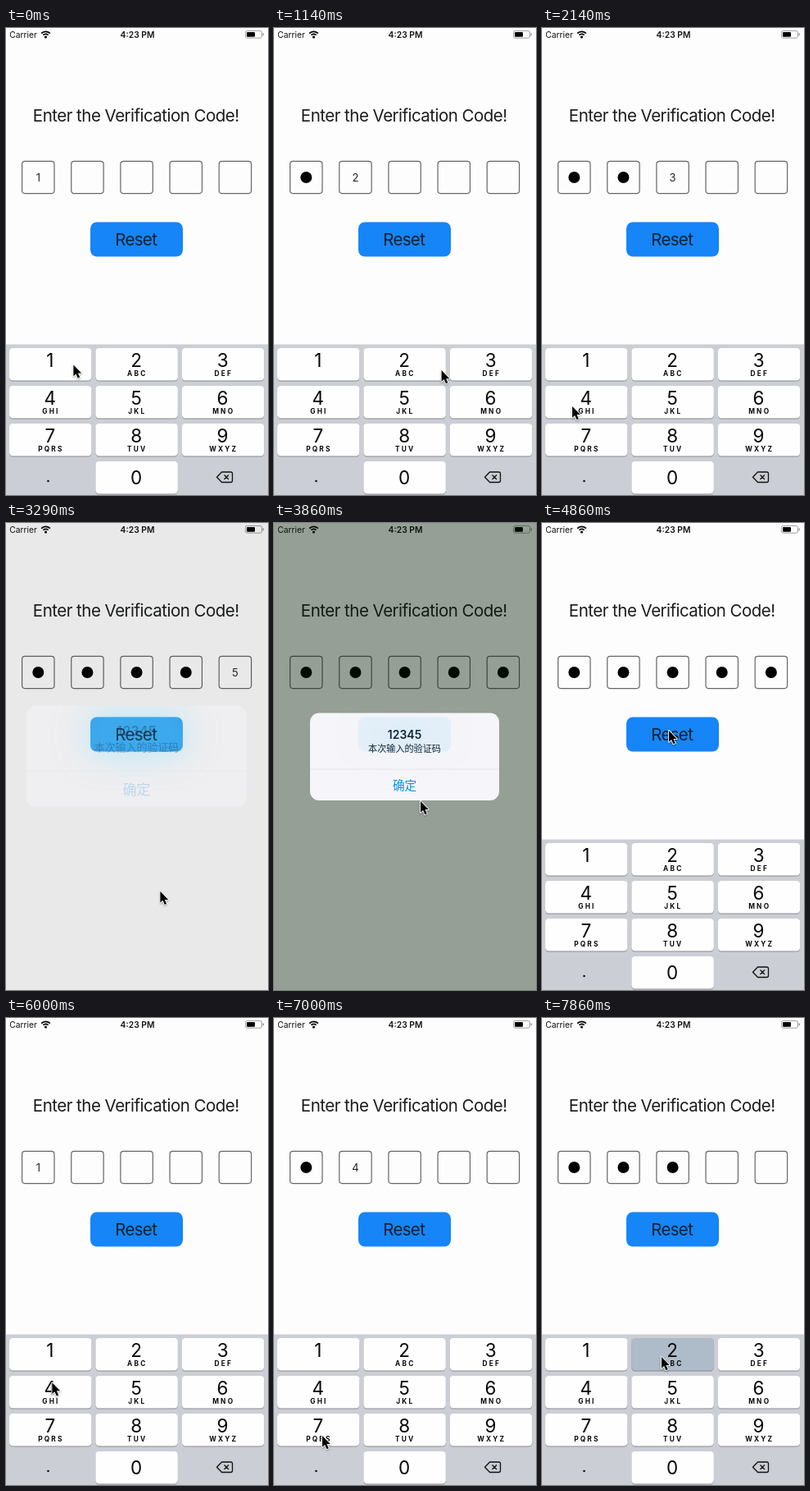
Animation of 320 by 569 pixels, one loop 8000 ms. Source, as an HTML page with a canvas:

```html
<!DOCTYPE html>
<html lang="en">
<head>
<meta charset="utf-8">
<title>Verification code</title>
<style>
  html, body { margin: 0; width: 100%; height: 100%; overflow: hidden; background: #fefdfe; }
  canvas { display: block; width: 320px; height: 569px; }
</style>
</head>
<body>
<canvas id="stage"></canvas>
<script>
const W = 320, H = 569, LOOP = 8000;
const canvas = document.getElementById('stage');
const ctx = canvas.getContext('2d');
const ratio = window.devicePixelRatio || 1;
canvas.width = W * ratio;
canvas.height = H * ratio;

const FONT = 'Inter, "Noto Sans CJK SC", "Noto Sans CJK", sans-serif';
const LETTERS = ['', 'ABC', 'DEF', 'GHI', 'JKL', 'MNO', 'PQRS', 'TUV', 'WXYZ'];
const BUTTON = [103, 236.5, 113, 42, 8];
const KEY = { left: 4, top: 390, pitchX: 105.4, pitchY: 46, w: 100.4, h: 39.5 };

const HOLD = 140, MASK_DELAY = 600;
const KEYBOARD_HIDE = 2880, ALERT_SHOW = 3254, CONFIRM = 4300, KEYBOARD_SHOW = 4315, RESET = 5040;

const clamp = v => Math.max(0, Math.min(1, v));
const easeOut = v => 1 - (1 - v) ** 3;

// Critically damped spring going from 0 to 1
function spring(ms) {
  const x = 0.02285 * Math.max(0, ms);
  return 1 - (1 + x) * Math.exp(-x);
}

// Taps at the given points, ending at `last`; earlier gaps are longer by `slowdown`
function typeKeys(points, last, gap, slowdown) {
  return points.map(([x, y], i) => {
    const k = points.length - 1 - i;
    const column = Math.floor(x / KEY.pitchX), row = Math.floor((y - KEY.top) / KEY.pitchY);
    return { x, y, digit: 1 + column + 3 * row, time: last - gap * k - slowdown * k * (k - 1) / 2 };
  });
}

const taps = [
  ...typeKeys([[75, 410], [147, 414], [260, 420], [37, 461], [189, 456]], 2870, 430, 250),
  { x: 179, y: 339, time: CONFIRM },
  { x: 155, y: 253, time: RESET },
  ...typeKeys([[52, 406], [57, 450], [59, 509], [146, 413]], 7930, 740, 0)
];
const keyTaps = taps.filter(tap => tap.digit);
const isHeld = (time, t) => t >= time - HOLD && t < time;

function box(x, y, w, h, r, fill, stroke) {
  ctx.beginPath();
  ctx.roundRect(x, y, w, h, r);
  if (fill) { ctx.fillStyle = fill; ctx.fill(); }
  if (stroke) { ctx.strokeStyle = stroke; ctx.stroke(); }
}

function disc(x, y, r, fill) {
  ctx.beginPath();
  ctx.arc(x, y, r, 0, 7);
  ctx.fillStyle = fill;
  ctx.fill();
}

// Text centred on (x, y) by its cap height
function label(str, x, y, size, color, weight = 400, spacing = 0) {
  ctx.font = `${weight} ${size}px ${FONT}`;
  ctx.letterSpacing = spacing + 'px';
  ctx.textAlign = 'center';
  ctx.fillStyle = color;
  ctx.fillText(str, x + spacing / 2, y + size * 0.364);
}

function faded(alpha, draw) {
  ctx.save();
  ctx.globalAlpha = clamp(alpha);
  draw();
  ctx.restore();
}

function fillStage(color) {
  ctx.fillStyle = color;
  ctx.fillRect(0, 0, W, H);
}

function statusBar() {
  label('Carrier', 21, 8, 10.3, '#111');
  label('4:23 PM', 160.5, 8, 10.3, '#111', 600);
  disc(48.5, 11, 1.6, '#000');
  ctx.strokeStyle = '#000';
  ctx.lineWidth = 1.7;
  for (const r of [4.2, 7.2]) {
    ctx.beginPath();
    ctx.arc(48.5, 11.5, r, -2.4, -0.74);
    ctx.stroke();
  }
  ctx.lineWidth = 0.8;
  box(292.5, 3.4, 20, 8.8, 2.2, null, '#888');
  box(294, 4.9, 10, 5.8, 1, '#000');
  box(313.6, 6.2, 1.2, 3.2, 0.6, '#888');
}

function resetLabel(alpha) {
  faded(alpha, () => label('Reset', 159, 258, 20.5, '#14202c', 400, -0.65));
}

function codeCells(t) {
  const entered = keyTaps.filter(tap => tap.time <= t && (t < RESET || tap.time > RESET));
  ctx.lineWidth = 1.2;
  for (let i = 0; i < 5; i++) {
    const x = 39.3 + i * 60.15;
    box(x - 19.7, 162.4, 39.4, 39.2, 3.5, null, '#666');
    if (!entered[i]) continue;
    if (t - entered[i].time > MASK_DELAY) disc(x, 182, 7, '#000');
    else label(entered[i].digit, x, 182, 13, '#222');
  }
}

function alertPanel(t) {
  const shown = spring(t - ALERT_SHOW);
  const p = shown - spring(t - CONFIRM);
  if (p < 0.004) return;

  faded(0.41 * p, () => fillStage('#001a00'));

  const k = 1 + 0.21 * (1 - shown);
  const zoom = () => { ctx.translate(159.5, 284.7); ctx.scale(k, k); };
  ctx.save();
  ctx.save();
  zoom();
  ctx.beginPath();
  ctx.roundRect(-115.5, -53.2, 231, 106.4, 11);
  ctx.restore();
  ctx.clip();

  faded(Math.sqrt(p), () => fillStage('#f6f5f9'));
  // Tint of the button showing through the frosted panel
  faded((0.82 - 0.75 * p) * Math.min(1, p * 8), () => {
    ctx.shadowColor = '#8fe4ff';
    ctx.shadowBlur = 40 * ratio;
    box(...BUTTON, '#1a9aea');
  });
  resetLabel(1 - p);

  zoom();
  if (isHeld(CONFIRM, t)) {
    ctx.fillStyle = 'rgba(0,0,0,.09)';
    ctx.fillRect(-116, 15.4, 232, 40);
  }
  faded(p * 1.5, () => {
    label('12345', 0, -27, 14, '#10283a', 600);
    label('本次输入的验证码', 0, -9.7, 11.1, '#10283a');
    ctx.fillStyle = '#d6dadd';
    ctx.fillRect(-116, 15, 232, 0.6);
  });
  faded(p * 1.1, () => label('确定', 0, 34.6, 14.6, '#0a90d8'));
  ctx.restore();
}

function keyboard(t) {
  const hidden = spring(t - KEYBOARD_HIDE) - spring(t - KEYBOARD_SHOW);
  const held = keyTaps.find(tap => isHeld(tap.time, t));
  ctx.save();
  ctx.translate(0, hidden * 184);
  ctx.fillStyle = '#cbced4';
  ctx.fillRect(0, 385.5, W, 184);
  for (let i = 0; i < 10; i++) {
    const digit = (i + 1) % 10;
    const column = digit ? i % 3 : 1;
    const row = digit ? Math.floor(i / 3) : 3;
    const x = KEY.left + column * KEY.pitchX, y = KEY.top + row * KEY.pitchY;
    const cx = x + KEY.w / 2 - 0.4;
    const pressed = held && held.digit === digit;
    box(x, y + 1, KEY.w, KEY.h, 4.2, '#898b90');
    box(x, y, KEY.w, KEY.h, 4.2, pressed ? '#aebbc9' : '#fefefe');
    label(digit, cx, y + (digit ? 14.4 : 19.4), 22.5, '#080808');
    if (LETTERS[i]) label(LETTERS[i], cx, y + 30.7, 8.3, '#080808', 700, 2.2);
  }
  disc(51.5, 552, 1.3, '#111');
  ctx.strokeStyle = '#111';
  ctx.lineWidth = 1.3;
  ctx.lineJoin = 'round';
  ctx.stroke(new Path2D('M257.5 547.2 L263.5 541 H274.5 Q276.5 541 276.5 543 V551.5 Q276.5 553.5 274.5 553.5 H263.5 Z M266.5 544.5 L272 550 M272 544.5 L266.5 550'));
  ctx.restore();
}

const arrow = new Path2D('M0 0 V13.8 L3.1 11 L5.4 16.3 L7.8 15.2 L5.5 10.1 H9.8 Z');

// Rests after each tap, then glides to the next one well before pressing
function pointer(t) {
  const from = taps.findLast(tap => tap.time <= t);
  const to = taps[taps.indexOf(from) + 1] || from;
  const share = (t - from.time) / (to.time - from.time || 1);
  const k = easeOut(clamp((share - 0.29) / 0.21));
  ctx.save();
  ctx.translate(from.x + (to.x - from.x) * k, from.y + (to.y - from.y) * k);
  ctx.lineJoin = 'round';
  ctx.lineWidth = 1.8;
  ctx.strokeStyle = '#fff';
  ctx.shadowColor = 'rgba(0,0,0,.35)';
  ctx.shadowBlur = 2 * ratio;
  ctx.shadowOffsetY = ratio;
  ctx.stroke(arrow);
  ctx.shadowColor = 'transparent';
  ctx.fillStyle = '#000';
  ctx.fill(arrow);
  ctx.restore();
}

function render(t) {
  ctx.setTransform(ratio, 0, 0, ratio, 0, 0);
  fillStage('#fefdfe');
  statusBar();
  label('Enter the Verification Code!', 159, 106.3, 20.5, '#1c1c1e', 400, -0.52);
  codeCells(t);
  box(...BUTTON, '#1685f8');
  resetLabel(isHeld(RESET, t) ? 0.3 : 1);
  alertPanel(t);
  keyboard(t);
  pointer(t);
}

const start = performance.now();
function tick() {
  render((performance.now() - start) % LOOP);
  requestAnimationFrame(tick);
}
tick();
</script>
</body>
</html>
```
